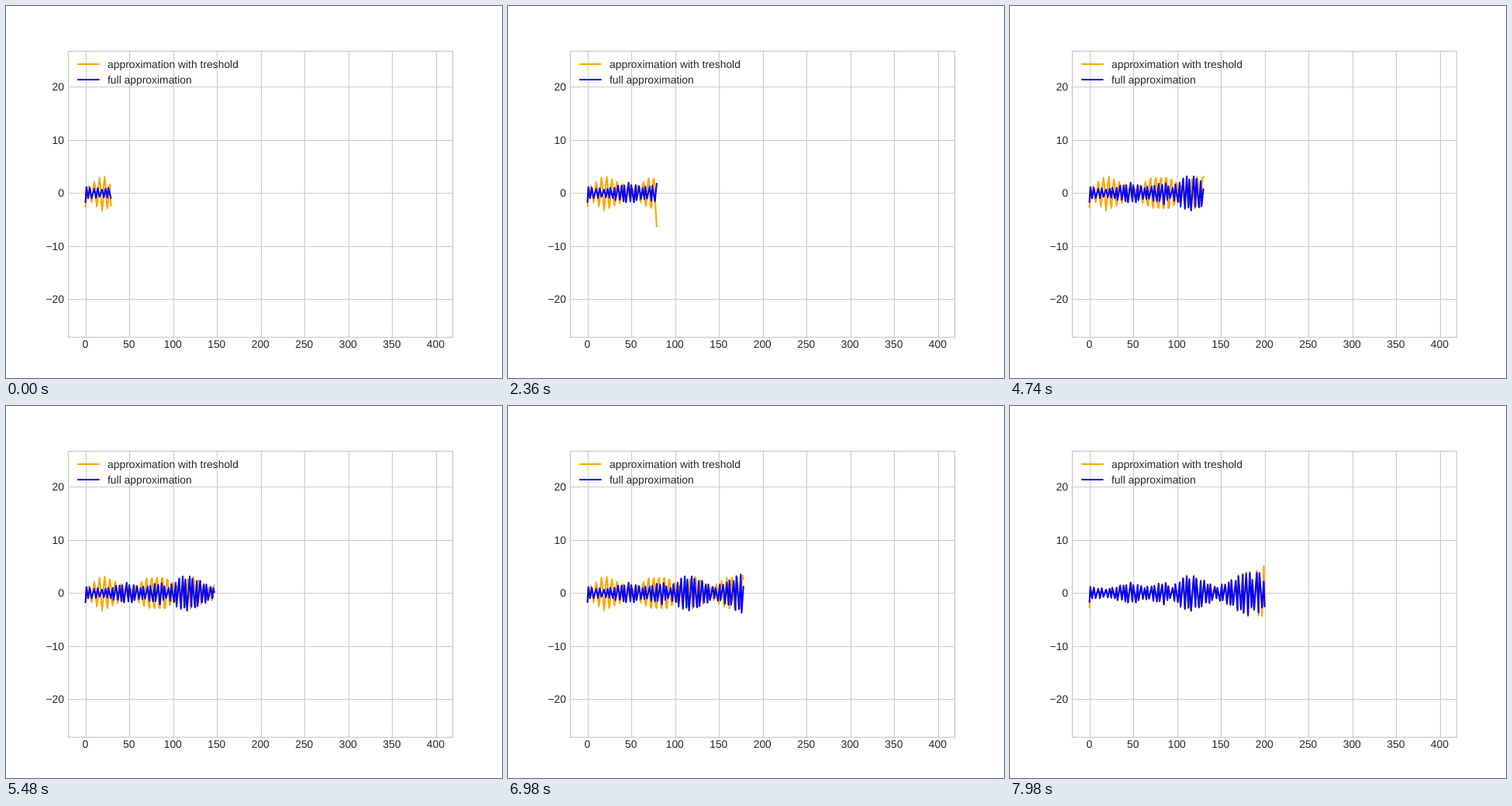
An HTML page for the animation above (8000 ms loop, 640 by 480 pixels).

```html
<!DOCTYPE html>
<html lang="en">
<head>
<meta charset="utf-8">
<title>Signal approximation</title>
<style>
  html, body { margin: 0; width: 100%; height: 100%; overflow: hidden; background: #fff; }
  svg { display: block; }
  text { font: 13.89px "Liberation Sans", Arial, sans-serif; fill: #262626; text-rendering: geometricPrecision; }
  .grid { stroke: #ccc; stroke-width: 1.11; }
  .frame { fill: none; stroke: #ccc; stroke-width: 1.39; }
  .curve { fill: none; stroke-width: 2.08; stroke-linecap: round; stroke-linejoin: round; }
  .orange { stroke: orange; }
  .blue { stroke: blue; }
</style>
</head>
<body>
<svg id="chart" width="640" height="480" viewBox="0 0 640 480"></svg>
<script>
const chart = document.getElementById('chart');
const LOOP = 8000, FIRST = 29, LAST = 200, CALM_FROM = 190;
const px = i => 102.55 + i * 1.1301;
const py = v => 241.4 - v * 6.85;
const snap = p => Math.round(p) + 0.5;
const cycle = turns => Math.cos(2 * Math.PI * turns);

function add(tag, attrs, text) {
  const el = document.createElementNS('http://www.w3.org/2000/svg', tag);
  for (const key in attrs) el.setAttribute(key, attrs[key]);
  if (text) el.textContent = text;
  return chart.appendChild(el);
}

function drawAxes() {
  for (let v = 0; v <= 400; v += 50) {
    const x = snap(px(v));
    add('line', { class: 'grid', x1: x, x2: x, y1: 58, y2: 427 });
    add('text', { x: px(v) - 0.3, y: 441, 'text-anchor': 'middle' }, String(v));
  }
  for (let v = -20; v <= 20; v += 10) {
    const y = snap(py(v));
    add('line', { class: 'grid', x1: 80, x2: 576, y1: y, y2: y });
    add('text', { x: 75, y: y + 4.5, 'text-anchor': 'end' }, String(v).replace('-', '\u2212'));
  }
}

function drawLegend() {
  [['orange', 'approximation with treshold', 75], ['blue', 'full approximation', 95]].forEach(([color, label, y]) => {
    add('path', { class: 'curve ' + color, d: `M93 ${y}H119.8` });
    add('text', { x: 131, y: Math.round(y + 4.5) }, label);
  });
}

// Linear interpolation through [index, value] knots.
function along(knots, i) {
  const k = Math.max(1, knots.findIndex(p => p[0] >= i));
  const [x0, y0] = knots[k - 1], [x1, y1] = knots[k];
  return y0 + (y1 - y0) * (i - x0) / (x1 - x0);
}

const fullSwell = [[0, 1.1], [20, .7], [48, 1.8], [64, 1], [86, 1.9], [93, .8], [109, 3],
  [122, 2.8], [145, 1], [167, 2.6], [180, 4.1], [187, 2.5], [192, 4], [204, 1.3]];
const reducedSwell = [[0, .8], [19, 3.3], [52, .8], [70, 3], [90, 3.3], [105, 1.5],
  [122, 3.3], [141, 1.1], [159, 2.9], [200, 2.9]];

// The full curve zigzags between crests and dips about four samples apart, some one sample early.
function zigzag() {
  const knots = [[0, -1.7]];
  for (let k = -5; k < 45; k++) {
    const at = 23 + Math.round(k * (k < 0 ? 4.4 : 4));
    const crest = at - (k * k % 6 === 1 && k > 0);
    const dip = at + 2 - (k % 3 === 2);
    const uneven = 1 + .12 * Math.sin(k * 2.4);
    knots.push([crest, along(fullSwell, crest) * uneven], [dip, -along(fullSwell, dip) / uneven]);
  }
  return knots;
}
const knots = zigzag();
const full = Array.from({ length: LAST + 1 }, (_, i) => along(knots, i));

// The reduced curve rings at its newest end, and later settles on the full one.
function reduced(i, last) {
  if (i === 0) return -2.2 + .6 * Math.sin(last);
  const age = last - i;
  if (last >= CALM_FROM) {
    return 1.05 * full[i] + 4 * Math.sin(Math.PI * age / 2) * Math.exp(-age / 3);
  }
  const kick = -3.5 * cycle((last - FIRST) / 3.125);
  return along(reducedSwell, i) * cycle((i - 16) / 5.96) + kick * Math.exp(-1.2 * age);
}

const points = (last, value) => Array.from({ length: last + 1 },
  (_, i) => px(i).toFixed(2) + ',' + py(value(i, last)).toFixed(2)).join(' ');

drawAxes();
const orange = add('polyline', { class: 'curve orange' });
const blue = add('polyline', { class: 'curve blue' });
add('rect', { class: 'frame', x: 80.5, y: 58.5, width: 496, height: 369 });
drawLegend();

// Samples arrive in threes: 20 ms, 20 ms, then a 100 ms hold.
function lastSample(time) {
  const t = time + 20;
  return FIRST - 1 + 3 * Math.floor(t / 140) + Math.min(2, Math.floor(t % 140 / 20));
}

let shown, start;
function draw(now) {
  start ??= now;
  const last = Math.min(LAST, lastSample((now - start) % LOOP));
  if (last !== shown) {
    shown = last;
    orange.setAttribute('points', points(last, reduced));
    blue.setAttribute('points', points(last, i => full[i]));
  }
  requestAnimationFrame(draw);
}
draw(performance.now());
</script>
</body>
</html>
```
